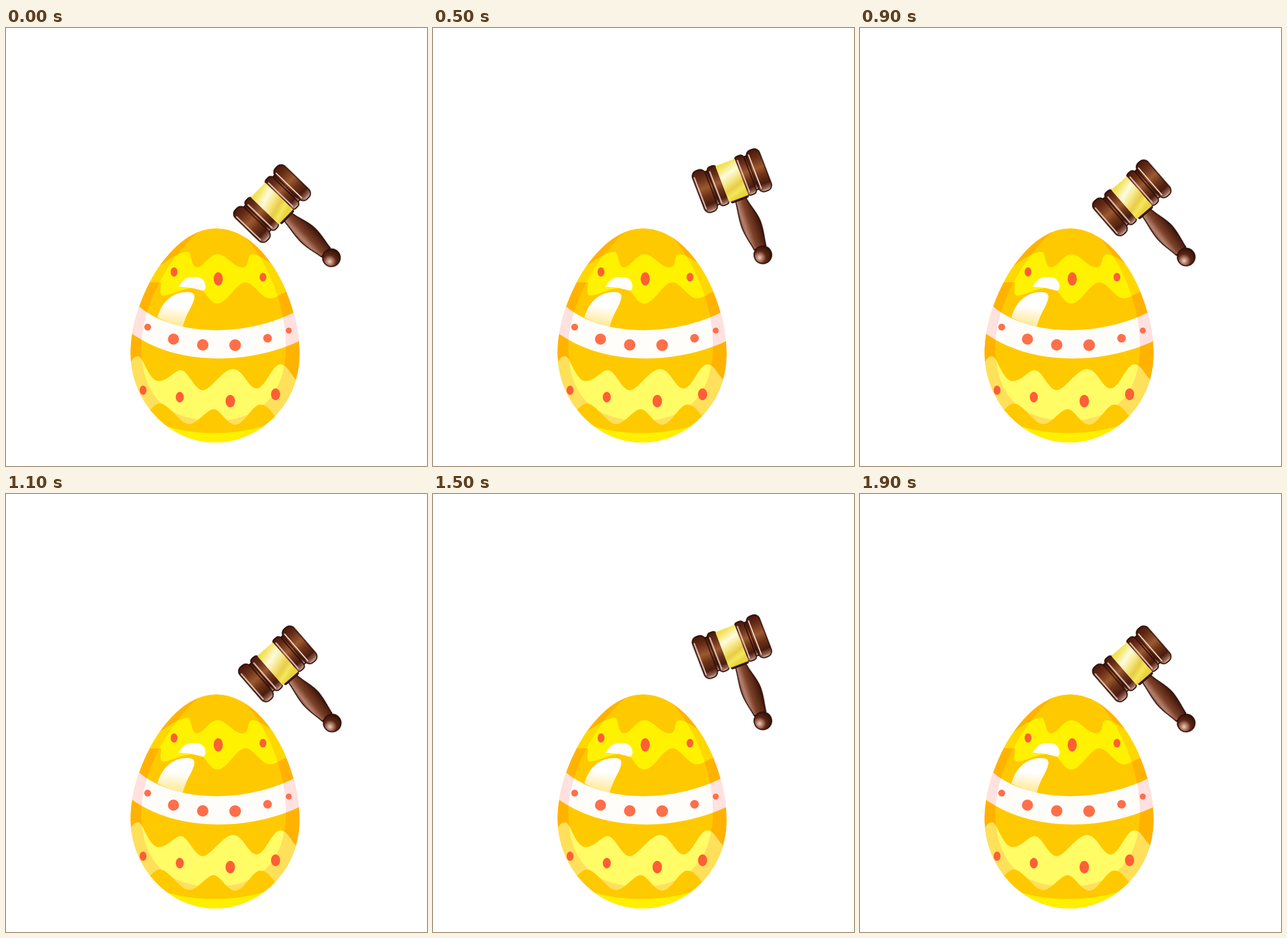
An HTML page for the animation above (2000 ms loop, 734 by 763 pixels).

```html
<!DOCTYPE html>
<html lang="en">
<head>
<meta charset="utf-8">
<title>Egg and gavel</title>
<style>
  html, body { margin: 0; width: 100%; height: 100%; overflow: hidden; background: #fff; }
  svg { display: block; width: 100%; height: 100%; }
  .swing { transform-origin: 582.5px 415.2px; animation: swing 1s infinite; }
  /* 5 degrees every 100 ms, up and back */
  @keyframes swing {
    0%, 100% { transform: rotate(0deg); animation-timing-function: steps(5, end); }
    50% { transform: rotate(25deg); animation-timing-function: steps(5, end); }
  }
</style>
</head>
<body>
<svg viewBox="0 0 734 763">
  <defs>
    <path id="shell" d="M366 349C453 349 512 478 512 568C512 655 443 722 364 722C285 722 217 652 217 565C217 478 285 349 366 349Z"/>
    <clipPath id="egg"><use href="#shell"/></clipPath>
    <linearGradient id="shine" x1=".55" y1="0" x2=".4" y2="1">
      <stop offset=".4" stop-color="#fff"/>
      <stop offset="1" stop-color="#fff" stop-opacity=".55"/>
    </linearGradient>
    <linearGradient id="wood" x2="0" y2="1">
      <stop offset="0" stop-color="#47180c"/>
      <stop offset=".2" stop-color="#672d17"/>
      <stop offset=".44" stop-color="#9c5930"/>
      <stop offset=".62" stop-color="#6c3318"/>
      <stop offset=".82" stop-color="#4a1c0f"/>
      <stop offset=".93" stop-color="#94604f"/>
      <stop offset="1" stop-color="#e0c4ba"/>
    </linearGradient>
    <linearGradient id="gold" x2=".15" y2="1">
      <stop offset="0" stop-color="#eedb42"/>
      <stop offset=".14" stop-color="#f4e566"/>
      <stop offset=".36" stop-color="#fefbe0"/>
      <stop offset=".55" stop-color="#f6e888"/>
      <stop offset=".74" stop-color="#e7cc46"/>
      <stop offset=".88" stop-color="#f5e75c"/>
      <stop offset="1" stop-color="#ead43e"/>
    </linearGradient>
    <linearGradient id="grip" y2=".15">
      <stop offset="0" stop-color="#723825"/>
      <stop offset=".22" stop-color="#b58270"/>
      <stop offset=".5" stop-color="#7e4228"/>
      <stop offset="1" stop-color="#41180d"/>
    </linearGradient>
    <radialGradient id="knob" cx=".27" cy=".58" r=".75">
      <stop offset="0" stop-color="#ecd0c2"/>
      <stop offset=".3" stop-color="#a36a54"/>
      <stop offset=".5" stop-color="#5c2715"/>
      <stop offset="1" stop-color="#2e0f08"/>
    </radialGradient>
  </defs>

  <g clip-path="url(#egg)">
    <use href="#shell" fill="#ffc900"/>
    <path fill="#fff200" d="M255 424C290 398 304 390 317 390C324 390 322 417 333 417S355 394 369 394S397 417 412 417S418 394 430 394S460 410 478 420L500 460C484 455 475 471 460 471S432 443 417 443S385 480 369 480S347 453 335 453C310 450 290 466 272 466C266 460 272 446 270 443L240 443Z"/>
    <path fill="#fffdfa" d="M225 479C290 541 420 538 505 494L514 544C425 587 295 590 215 529Z"/>
    <path fill="#fffc66" d="M213 600C218 572 226 572 231 572C239 572 249 615 266 615S293 596 305 596S329 631 343 631S378 594 396 594S422 628 437 628S464 586 478 586S495 605 512 618V730H213Z"/>
    <!-- darker rim -->
    <path fill="#f00" fill-opacity=".11" fill-rule="evenodd" d="M200 340H530V730H200ZM350 345C305 372 236 470 236 555C236 645 285 684 364 684C445 684 488 635 488 555C488 470 445 385 398 345Z"/>
    <path fill="#ffc900" d="M240 675C255 662 261 654 268 654C284 654 304 690 319 690S350 664 362 664S385 691 400 691S430 656 443 656S462 668 474 682L480 730H240Z"/>
    <path fill="#fff000" d="M260 685C310 713 420 712 472 684V730H260Z"/>

    <g fill="#ff5f35">
      <ellipse cx="293" cy="425" rx="6" ry="8"/>
      <ellipse cx="370" cy="437" rx="8" ry="11.5"/>
      <ellipse cx="448" cy="434" rx="6" ry="7.5"/>
      <ellipse cx="239" cy="631" rx="6" ry="8"/>
      <ellipse cx="303" cy="643" rx="7" ry="9.3"/>
      <ellipse cx="391" cy="650" rx="8.3" ry="11"/>
      <ellipse cx="470" cy="638" rx="8" ry="10.3"/>
    </g>
    <g fill="#ff6f4a">
      <circle cx="247" cy="521" r="6"/>
      <circle cx="292" cy="542" r="9.7"/>
      <circle cx="343" cy="552" r="10"/>
      <circle cx="399.5" cy="552.5" r="10.2"/>
      <circle cx="456" cy="540.5" r="7.6"/>
      <circle cx="493" cy="527" r="5.2"/>
    </g>

    <path fill="#fffefa" d="M301 451C308 439 314 434 326 434C341 433 347 439 348 450C347 458 344 458 340 457C327 453 315 451 301 451Z"/>
    <path fill="url(#shine)" d="M264 504C271 479 289 460 315 460C326 460 330 463 328 472C324 487 314 497 308 521Q285 516 264 504Z"/>
  </g>

  <g class="swing">
    <g transform="translate(463.5 305.5) rotate(-46)" stroke="#2b0d07" stroke-width="1.8" stroke-linejoin="round">
      <path fill="url(#grip)" d="M-7 36C-9 56-13 66-13 84C-13 102-8 115-7 127H15C16 115 21 102 21 84C21 66 13 52 12 36Z"/>
      <circle cx="4" cy="140.5" r="15.4" fill="url(#knob)"/>
      <rect x="-14" y="32" width="31" height="5" rx="1.5" fill="#4a1d10"/>
      <g fill="url(#wood)">
        <rect x="-42" y="-31" width="84" height="62"/>
        <rect x="-62.5" y="-38" width="24" height="77" rx="10"/>
        <rect x="38.5" y="-38" width="24" height="77" rx="10"/>
        <rect x="-34" y="-36" width="17" height="72" rx="6"/>
        <rect x="17" y="-36" width="17" height="72" rx="6"/>
      </g>
      <rect x="-18" y="-33.5" width="36" height="67.5" fill="url(#gold)" stroke="none"/>
      <path fill="none" stroke="#f0d8ce" stroke-width="2" stroke-linecap="round" d="M-59.5-28V30M-30.5-28V30M21.5-29V30M43-31V31"/>
    </g>
  </g>
</svg>
</body>
</html>
```
